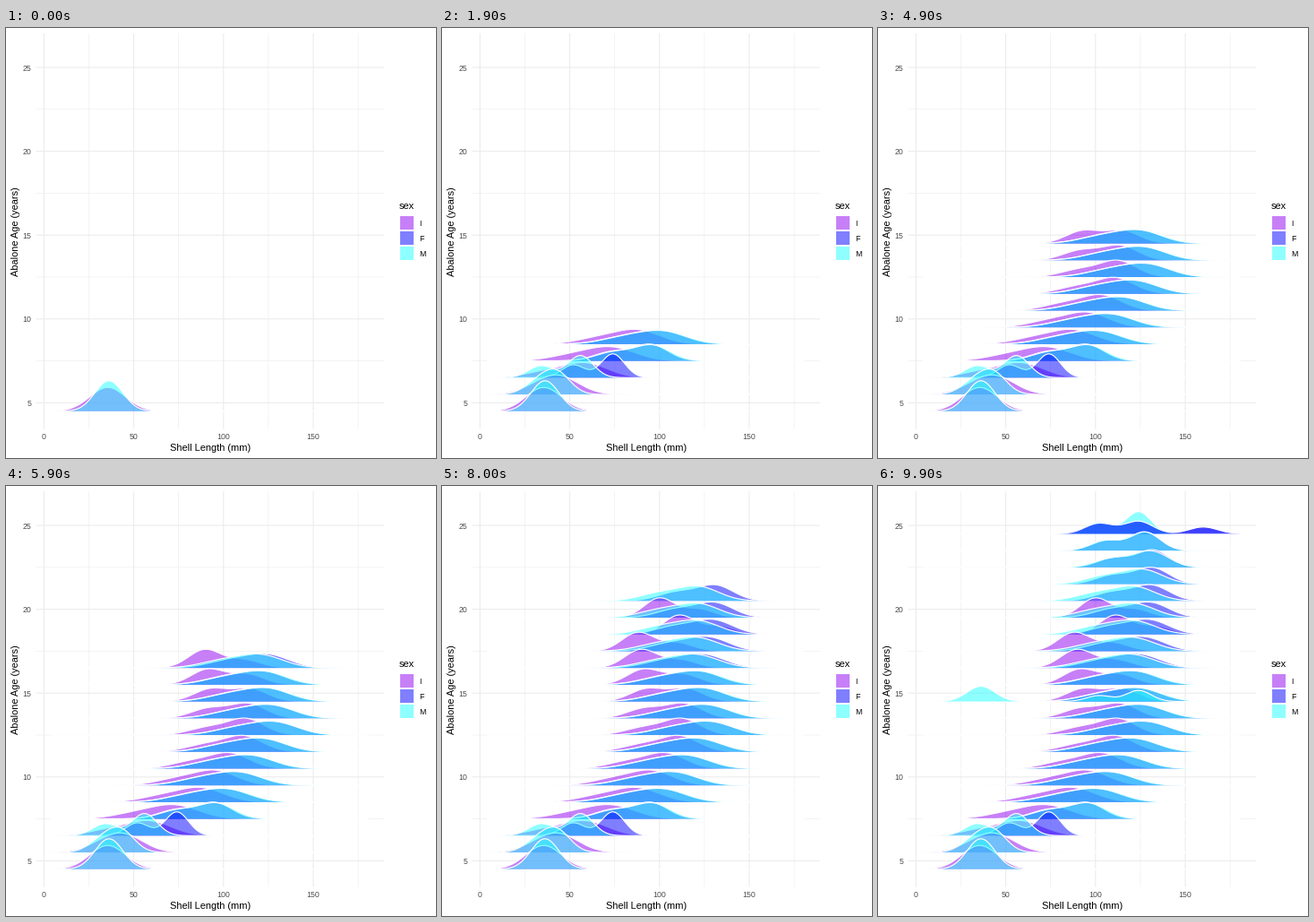
Recreate the animation shown at these times as a matplotlib script. Size 480x480 px, loop 10 s.

```python
import numpy as np
import matplotlib.pyplot as plt
from matplotlib.animation import FuncAnimation
from matplotlib.patches import Polygon, Rectangle

SIZE, DPI = 480, 80
PT = 72 / DPI
plt.rcParams["font.family"] = ["Liberation Sans"]

FRAMES, INTERVAL = 100, 100
AGES = 21
AREA = 265

# Key points are (age step, value). Every sex has a main bump and, 22 mm
# below it, a shoulder holding a share of the animals.
SEXES = {
    "I": dict(color="#9000f0", steps=range(0, 16), late=0,
              center=[(0, 35.5), (1, 45), (4, 88), (7, 111), (10, 115),
                      (13, 110), (14, 133), (15, 122)],
              spread=[(0, 10), (3, 13), (6, 11), (10, 9.5), (15, 8.5)],
              share=[(8, .3), (12, .7)]),
    "F": dict(color="#0000ff", steps=range(2, 21), late=.23,
              center=[(2, 74), (3, 95), (8, 129), (11, 122), (14, 130),
                      (18, 132), (20, 124)],
              spread=[(2, 6.5), (4, 12.5), (12, 12), (20, 8)],
              share=[(0, .35)]),
    "M": dict(color="#1effff", steps=range(0, 21), late=0,
              center=[(0, 36.2), (1, 43), (2, 56), (3, 96), (8, 129),
                      (12, 121), (16, 122), (18, 131), (20, 124)],
              spread=[(0, 7.8), (2, 7), (4, 13), (12, 12.5), (17, 11),
                      (20, 7)],
              share=[(0, .35)]),
}

LENGTH = np.linspace(4.1, 180.6, 320)


def px(length):
    return 42.4 + 2.004 * length


def py(age):
    return 418.4 - 18.72 * (age - 5)


def age_of(step):
    return 4.5 + step


def at(points, step):
    return np.interp(step, *zip(*points))


def density(sex, step):
    center, sd = at(sex["center"], step), at(sex["spread"], step)
    share = at(sex["share"], step)
    late = sex["late"] * np.exp(4 * (step - AGES + 1))
    bumps = ((center, 1 - share - late),
             (center - min(22, 11 * step), share),
             (center + 36, late))
    return sum(AREA * w / sd * np.exp(-((LENGTH - c) / sd) ** 2 / 2)
               for c, w in bumps)


curves = {(k, s): density(sex, k)
          for s, sex in enumerate(SEXES.values()) for k in sex["steps"]}

fig = plt.figure(figsize=(SIZE / DPI, SIZE / DPI), dpi=DPI, facecolor="white")
ax = fig.add_axes([0, 0, 1, 1])
ax.set(xlim=(0, SIZE), ylim=(SIZE, 0))
ax.axis("off")

LEFT, RIGHT, TOP, BOTTOM = 33.5, 422, 6, 447.5


def grid(xs, ys, width):
    style = dict(colors="#ebebeb", linewidths=width * PT, zorder=1,
                 snap=False)
    ax.vlines([px(x) for x in xs], TOP, BOTTOM, **style)
    ax.hlines([py(y) for y in ys], LEFT, RIGHT, **style)


def label(x, y, text, size=8.8, color="black", **kw):
    ax.text(x, y, text, fontsize=size * PT, color=color, va="baseline", **kw)


lengths, ages = range(0, 151, 50), range(5, 26, 5)
grid([x + 25 for x in lengths], [y + 2.5 for y in ages[:-1]], 0.55)
grid(lengths, ages, 1.07)
for v in lengths:
    label(px(v), 459.2, str(v), color="#4d4d4d", ha="center")
for v in ages:
    label(28.6, py(v) + 3.5, str(v), color="#4d4d4d", ha="right")
label(228, 472, "Shell Length (mm)", 11, ha="center")
label(14, 227.5, "Abalone Age (years)", 11, ha="center",
      rotation=90, rotation_mode="anchor")
label(438.5, 201.5, "sex", 11)
for i, (name, sex) in enumerate(SEXES.items()):
    y = 217.3 + 17.28 * i
    ax.add_patch(Rectangle((440.2, y - 7.7), 15.2, 15.2, fc=sex["color"],
                           alpha=.5, lw=0))
    label(461.5, y + 3.4, name)


class Ridge:
    """Translucent area under a white outline; lower ages lie in front."""

    def __init__(self, s, color, lift=0.0):
        self.lift = lift + .01 * s
        self.area = Polygon([(0, 0), (1, 0), (1, 1)], fc=color,
                            alpha=.5, lw=0)
        ax.add_patch(self.area)
        self.line, = ax.plot([], [], color="white", lw=1.15 * PT)

    def place(self, age, height):
        x, base = px(LENGTH), py(age)
        y = base - height
        self.area.set_xy([(x[0], base), *zip(x, y), (x[-1], base)])
        self.line.set_data(x, y)
        for part in (self.area, self.line):
            part.set_zorder(50 - age + self.lift)

    def show(self, on):
        self.area.set_visible(on)
        self.line.set_visible(on)


colors = [sex["color"] for sex in SEXES.values()]
still = {}
for (k, s), h in curves.items():
    still[k, s] = Ridge(s, colors[s])
    still[k, s].place(age_of(k), h)
movers = [Ridge(s, color, .05) for s, color in enumerate(colors)]

# Each age rests, then passes halfway to the next; the last ages rest shorter.
HALFWAY = [5 * k + 3 - max(0, k - 16) for k in range(AGES)]


def draw(frame):
    now = sum(m < frame for m in HALFWAY)
    moving = frame in HALFWAY
    after = (now + 1) % AGES
    for (k, _), ridge in still.items():
        ridge.show(k <= now)
    for s, ridge in enumerate(movers):
        a, b = curves.get((now, s)), curves.get((after, s))
        ridge.show(moving and a is not None)
        if moving and a is not None:
            if b is None:
                ridge.place(age_of(now), a)
            else:
                ridge.place((age_of(now) + age_of(after)) / 2, (a + b) / 2)
    return []


anim = FuncAnimation(fig, draw, frames=FRAMES, interval=INTERVAL,
                     init_func=lambda: draw(0), repeat=True, repeat_delay=0)
plt.show()
```
